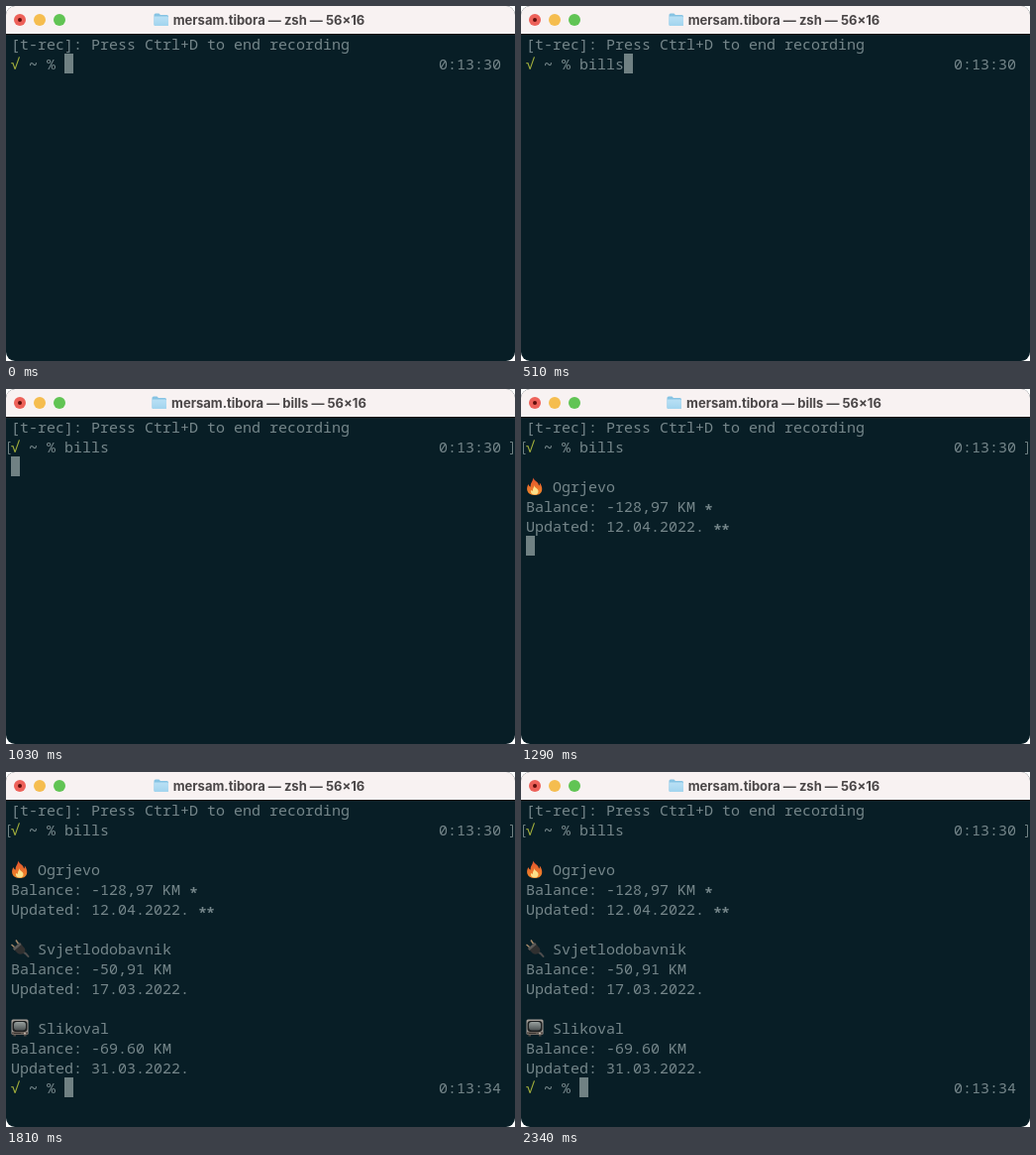
Recreate the animation shown at these times as an HTML page. Size 514x358 px, loop 7.6 s.

```html
<!DOCTYPE html>
<html lang="en">
<head>
<meta charset="utf-8">
<title>Terminal: bills</title>
<style>
  html, body { margin: 0; width: 100%; height: 100%; overflow: hidden; background: #fff; }
  svg { display: block; width: 514px; height: 358px; }
  text { white-space: pre; }
  .mono { font: 500 15px "Noto Sans Mono", "DejaVu Sans Mono", monospace; fill: #75868a; }
  .check { fill: #a3b03c; }
  .bold { font-weight: 700; }
  .mark { font-weight: 600; letter-spacing: -1px; }
  .title { font: 700 13px Inter, Roboto, sans-serif; fill: #4a4647; text-anchor: middle; }
</style>
</head>
<body>
<svg viewBox="0 0 514 358">
  <defs>
    <clipPath id="window"><rect width="514" height="358" rx="9"/></clipPath>
    <linearGradient id="fire" x1="0" y1="0" x2="0" y2="1">
      <stop offset="0" stop-color="#e2512f"/>
      <stop offset="1" stop-color="#f18a28"/>
    </linearGradient>
    <linearGradient id="paper" x1="0" y1="0" x2="0" y2="1">
      <stop offset="0" stop-color="#b9e0f5"/>
      <stop offset="1" stop-color="#a2d4ee"/>
    </linearGradient>
    <linearGradient id="glass" x1="0" y1="0" x2="0" y2="1">
      <stop offset="0" stop-color="#98a09e"/>
      <stop offset="1" stop-color="#4c5253"/>
    </linearGradient>
    <g id="flame">
      <path d="M7 0.500C9 4 13 5 13 8.500C14 8 14 7 13.800 5.500C17 9 18.500 18 9 18C0 18 0 10.500 2.500 7C3 8.500 3.500 9.500 4.800 9.500C4 6 7.500 4 7 0.500Z" fill="url(#fire)"/>
      <path d="M8.500 8C8.500 11 12.500 11 12.500 14.300C12.500 16.800 11 17.500 9 17.500C6 17.500 4.500 16 5 13C6 13.800 6.500 13.800 7 13.500C6.500 11 8.500 10.500 8.500 8Z" fill="#fbe08a"/>
    </g>
    <g id="plug">
      <path d="M12 12.500Q15 13.500 17.500 17" fill="none" stroke="#4d4d4d" stroke-width="2" stroke-linecap="round"/>
      <path d="M0.500 5L4 8M5 0.500L8 5" stroke="#a58a6a" stroke-width="1.500"/>
      <path d="M2 9L9 3L14 9Q15 12 12.500 14Q9 15.500 7 14Z" fill="#303030"/>
      <path d="M2 9L9 3L10.500 5L3.500 11Z" fill="#5c5a58"/>
    </g>
    <g id="tv">
      <rect x="0.500" y="0.500" width="17" height="15.500" rx="1.500" fill="#a39d97"/>
      <rect x="1.500" y="2" width="15" height="11" rx="3" fill="#1d1f20"/>
      <rect x="3" y="3" width="12" height="8.500" rx="3" fill="url(#glass)"/>
      <rect x="1" y="13.200" width="16" height="2.500" fill="#5b524c"/>
      <path d="M3 14.500H10" stroke="#38332f"/>
      <circle cx="14" cy="14.500" r="1" fill="#c7bdb2"/>
      <path d="M2.500 16.700H5M13 16.700H15.500" stroke="#4c4743" stroke-width="1.400"/>
    </g>
  </defs>
  <g clip-path="url(#window)">
    <rect width="514" height="358" fill="#081e26"/>
    <rect width="514" height="28" fill="#f8f2f2"/>
    <rect y="28" width="514" height="1" fill="#020d12"/>
    <circle cx="14" cy="14" r="6" fill="#ed6159"/>
    <circle cx="14" cy="14" r="2" fill="#5f0d0b"/>
    <circle cx="34" cy="14" r="6" fill="#f5bd4f"/>
    <circle cx="54" cy="14" r="6" fill="#61c454"/>
    <g id="folder">
      <path d="M0 2Q0 0.500 1.500 0.500H5L6.500 2H13Q14.500 2 14.500 3.500V11.500Q14.500 13 13 13H1.500Q0 13 0 11.500Z" fill="#86c3e3"/>
      <rect y="3.500" width="14.500" height="9.500" rx="1.200" fill="url(#paper)"/>
    </g>
    <text id="title" class="title" x="265.500" y="18.500"></text>
    <g id="screen"></g>
    <rect id="cursor" width="9" height="20" fill="#708183"/>
  </g>
</svg>
<script>
const LOOP = 7600;
const CELL = { w: 9, h: 20, left: 5, top: 28 };
const $ = id => document.getElementById(id);
const colX = col => CELL.left + col * CELL.w;
const rowY = row => CELL.top + row * CELL.h;
const timed = [];

function add(tag, attrs, since = 0, content = '') {
  const node = document.createElementNS('http://www.w3.org/2000/svg', tag);
  for (const key in attrs) node.setAttribute(key, attrs[key]);
  node.textContent = content;
  $('screen').append(node);
  timed.push({ node, since });
  return node;
}

function write(row, col, content, since, cls = '', drop = 0) {
  return add('text', { x: colX(col), y: rowY(row) + 16 + drop, class: 'mono ' + cls }, since, content);
}

function prompt(row, clock, since) {
  write(row, 0, '√', since, 'check');
  write(row, 2, '~', since, 'bold');
  write(row, 4, '%', since);
  write(row, 48, clock, since);
}

function bill(row, since, icon, name, balance, updated, marks = ['', '']) {
  add('use', { href: '#' + icon, x: 5, y: rowY(row) + 1 }, since);
  write(row, 3, name, since);
  [`Balance: ${balance}`, `Updated: ${updated}`].forEach((line, i) => {
    write(row + 1 + i, 0, line, since);
    write(row + 1 + i, line.length + 1, marks[i], since, 'mark', 2.5);
  });
}

write(0, 0, '[t-rec]: Press Ctrl+D to end recording', 0);
prompt(1, '0:13:30', 0);
const command = write(1, 6, '', 0);
add('path', { d: 'M4.500 53.500H2.500V65.500H4.500M509 53.500H511.500V65.500H509', fill: 'none', stroke: '#708284' }, 770);
bill(3, 1290, 'flame', 'Ogrjevo', '-128,97 KM', '12.04.2022.', ['*', '**']);
bill(7, 1550, 'plug', 'Svjetlodobavnik', '-50,91 KM', '17.03.2022.');
bill(11, 1810, 'tv', 'Slikoval', '-69.60 KM', '31.03.2022.');
prompt(14, '0:13:34', 1810);

// Each step: start time, cursor row and column, typed letters
const steps = [
  [0, 1, 6, 0], [250, 1, 8, 2], [510, 1, 11, 5], [770, 2, 0, 5],
  [1290, 6, 0, 5], [1550, 10, 0, 5], [1810, 14, 6, 5]
];

function render(t) {
  const [, row, col, typed] = steps.findLast(step => step[0] <= t);
  $('cursor').setAttribute('x', colX(col));
  $('cursor').setAttribute('y', rowY(row));
  command.textContent = 'bills'.slice(0, typed);

  const running = t >= 1030 && t < 1810;
  $('title').textContent = `mersam.tibora — ${running ? 'bills' : 'zsh'} — 56×16`;
  $('folder').setAttribute('transform', `translate(${running ? 147.5 : 149.5} 7)`);
  for (const { node, since } of timed) node.style.display = t >= since ? '' : 'none';
}

const start = performance.now();
function tick() {
  render((performance.now() - start) % LOOP);
  requestAnimationFrame(tick);
}
tick();
</script>
</body>
</html>
```
